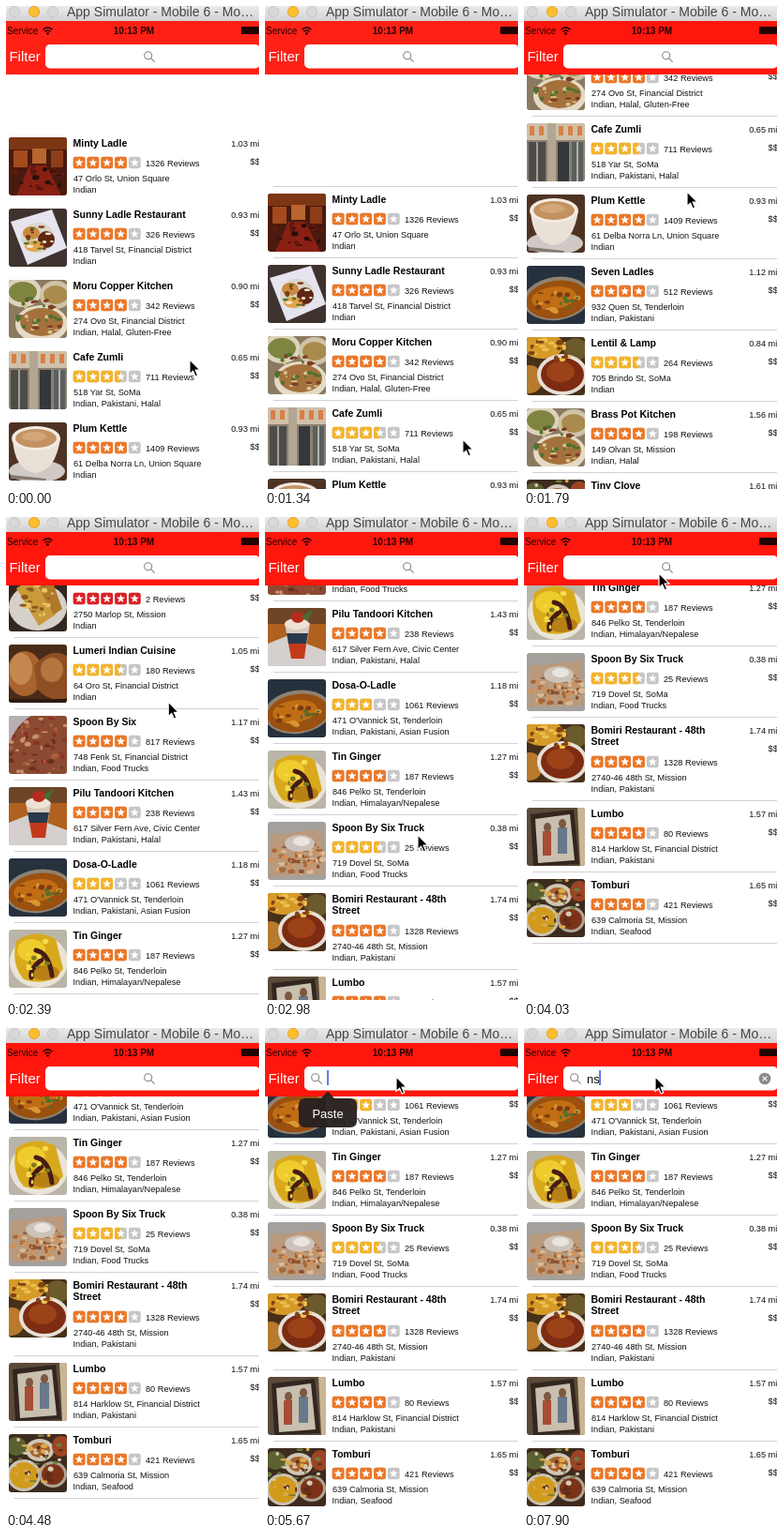
Write an HTML page that moves like this. It is 270 px wide and 515 px high and loops after 8000 ms.

```html
<!DOCTYPE html>
<html lang="en">
<head>
<meta charset="utf-8">
<title>Restaurant list</title>
<style>
  html, body { margin: 0; width: 100%; height: 100%; overflow: hidden; background: #fff; }
  svg { display: block; }
  text { font-family: "Liberation Sans", Arial, sans-serif; white-space: pre; }
  .name { font-size: 10.5px; font-weight: bold; fill: #000; }
  .info { font-size: 9.2px; fill: #111; }
  .right { text-anchor: end; }
</style>
</head>
<body>
<svg id="stage" width="270" height="515" viewBox="0 0 270 515">
  <defs>
    <clipPath id="round"><rect width="62" height="62" rx="3"/></clipPath>
    <linearGradient id="chrome" x2="0" y2="1">
      <stop stop-color="#ebeaeb"/><stop offset="1" stop-color="#d3d2d3"/>
    </linearGradient>
  </defs>
  <rect width="270" height="515" fill="#fff"/>
  <g id="list"><g id="lines"></g><g id="rows"></g></g>

  <rect id="bar" y="16" width="270" height="57"/>
  <rect width="270" height="16" fill="url(#chrome)"/>
  <g stroke-width=".8">
    <circle cx="9" cy="6" r="5.7" fill="#d9d8d9" stroke="#c3c2c3"/>
    <circle cx="30" cy="6" r="5.7" fill="#fdbd2e" stroke="#dfa023"/>
    <circle cx="50" cy="6" r="5.7" fill="#d9d8d9" stroke="#c3c2c3"/>
  </g>
  <text x="65" y="11.4" font-size="14" fill="#444">App Simulator - Mobile 6 - Mo…</text>

  <g fill="#210402">
    <text x="1" y="30" font-size="10">Service</text>
    <text x="136.5" y="30" font-size="10" font-weight="bold" text-anchor="middle">10:13 PM</text>
    <rect x="251" y="22" width="24" height="8" rx="1.5"/>
    <circle cx="44.5" cy="29.4" r="1.3"/>
    <path d="M39.5 25.2q5-4.6 10 0M41.5 27.4q3-2.8 6 0" fill="none" stroke="#210402" stroke-width="1.5"/>
  </g>

  <text x="3.4" y="58.8" font-size="15" fill="#fff">Filter</text>
  <rect x="42" y="41" width="229" height="25.5" rx="5" fill="#fff"/>
  <g id="lens" fill="none" stroke="#85858a" stroke-width="1.1">
    <circle cx="-1.3" cy="-1.3" r="4"/><path d="M1.6 1.6L5.6 5.6"/>
  </g>
  <text id="query" x="67" y="58.5" font-size="13" fill="#111"></text>
  <rect id="caret" y="45" width="1.7" height="16" fill="#4568e6"/>
  <g id="clear">
    <circle cx="257" cy="54" r="6.3" fill="#88888d"/>
    <path d="M254.6 51.6l4.8 4.8m0-4.8l-4.8 4.8" stroke="#fff" stroke-width="1.2"/>
  </g>
  <g id="paste">
    <path d="M43 75H60L67 67.5L74 75H91Q98 75 98 82V99Q98 106 91 106H43Q36 106 36 99V82Q36 75 43 75Z" fill="#272120" fill-opacity=".96"/>
    <text x="67" y="95.5" font-size="13" fill="#fff" text-anchor="middle">Paste</text>
  </g>
  <path id="mouse" d="M0 0V15.4L3.6 12.2L6.2 18L8.7 16.9L6.2 11.2H11Z" fill="#000" stroke="#fff" stroke-width="1.2"/>
</svg>

<script>
const $ = id => document.getElementById(id);

// Photo parts, each in a 62 px square
const box = (x, y, w, h, fill) => `<rect x="${x}" y="${y}" width="${w}" height="${h}" fill="${fill}"/>`;
const oval = (x, y, rx, ry, fill) => `<ellipse cx="${x}" cy="${y}" rx="${rx}" ry="${ry}" fill="${fill}"/>`;
const poly = (d, fill) => `<path d="${d}" fill="${fill}"/>`;
const base = fill => box(0, 0, 62, 62, fill);

function specks(seed, count, x, y, rx, ry, ...colors) {
  const rand = () => (seed = seed * 16807 % 2147483647) / 2147483647;
  rand();
  let out = "";
  for (let i = 0; i < count; i++) {
    const a = rand() * 6.283, d = Math.sqrt(rand());
    out += oval((x + Math.cos(a) * d * rx).toFixed(1), (y + Math.sin(a) * d * ry).toFixed(1),
      (1 + rand() * 3).toFixed(1), (.8 + rand() * 2).toFixed(1), colors[i % colors.length]);
  }
  return out;
}

const photos = {
  room: () => base("#4a1a0e") + box(0, 0, 62, 13, "#7c3614") + box(5, 14, 15, 18, "#a54a1c") +
    box(25, 12, 15, 16, "#b9652f") + box(45, 14, 13, 18, "#8d3d19") +
    poly("M22 30H40L56 62H8Z", "#8a2014") + specks(17, 26, 31, 43, 30, 13, "#2a0e0a", "#641a10"),
  plate: () => base("#3f3330") + poly("M2 14L46 1L62 42L20 60Z", "#e6e4ee") + oval(31, 31, 18, 16, "#dcd5cc") +
    oval(24, 26, 9, 7, "#c98a3e") + oval(40, 33, 9, 9, "#5f2614") + oval(27, 40, 10, 6, "#e3a44c") +
    specks(5, 16, 32, 32, 15, 13, "#7d3a17", "#f2e7d0", "#54752e"),
  bowls: () => base("#8a7a62") + oval(15, 13, 20, 16, "#ddd3bd") + oval(15, 13, 15, 11, "#7f8541") +
    oval(50, 16, 17, 15, "#cfc3a7") + oval(50, 16, 13, 10, "#a98b4d") + oval(35, 47, 28, 20, "#e4dac5") +
    oval(35, 45, 23, 15, "#a4713c") + specks(23, 34, 34, 38, 25, 22, "#4f7230", "#d8c28d", "#7d3f23"),
  shop: () => base("#8c8071") + box(0, 0, 62, 18, "#cfc0aa") +
    [3, 13, 34, 44, 54].map(x => box(x, 3, 5, 10, "#d87f45")).join("") + box(22, 0, 9, 62, "#b3a692") +
    box(2, 20, 18, 42, "#4d4c49") + box(33, 20, 12, 42, "#35383a") + box(48, 20, 12, 42, "#59605f") +
    box(10, 20, 2, 42, "#a5a095") + box(53, 20, 2, 42, "#b5b0a4"),
  cup: () => base("#4e3323") + oval(30, 52, 30, 12, "#cfc8c4") + poly("M4 17Q6 51 28 54Q50 52 55 17Z", "#e9e1d8") +
    oval(29, 17, 26, 13, "#f2ebe2") + oval(29, 17, 22, 10, "#c39263") + oval(27, 15, 13, 5, "#d2a678") +
    poly("M2 56L40 60L39 62L2 60Z", "#85786e"),
  rolls: () => base("#33271f") + oval(31, 36, 31, 25, "#d5d1c8") + poly("M8 16L24 6L50 44L32 56Z", "#c99a3a") +
    poly("M27 8L45 4L57 38L48 44Z", "#b0782a") + specks(9, 20, 31, 29, 18, 18, "#e6c365", "#8d5820"),
  pastry: () => base("#4a2a18") + oval(17, 31, 19, 24, "#a8632f") + oval(13, 26, 12, 17, "#c58850") +
    poly("M27 22Q45 2 62 12V57Q42 62 30 47Z", "#8f4f24") + oval(46, 27, 12, 13, "#b57640") + box(0, 58, 62, 4, "#2e1a10"),
  stew: () => base("#8a4b32") + specks(31, 75, 31, 31, 36, 36, "#a9603c", "#64301f", "#c88f6d", "#8e2e22") +
    poly("M0 0H24Q8 9 0 30Z", "#b5afb3"),
  glass: () => base("#b0611f") + box(0, 0, 62, 17, "#6d4526") + poly("M0 38L20 30L62 46V62H0Z", "#d5cfcd") +
    poly("M18 16H45L39 55H25Z", "#d9cabf") + poly("M20 27H43L41 38H22Z", "#27394a") + poly("M22 38H41L39 54H25Z", "#c23a1b") +
    oval(31, 17, 13, 6, "#eee2d4") + oval(32, 10, 7, 6, "#b82a1c") + poly("M36 9L49 1L42 14Z", "#496c31"),
  curry: () => base("#26313d") + `<g transform="rotate(-8 31 35)">` + oval(32, 35, 36, 23, "#8f8271") +
    oval(32, 36, 33, 20, "#9a500f") + oval(29, 34, 24, 12, "#c06d14") + "</g>" +
    specks(41, 24, 31, 36, 24, 13, "#7c3b12", "#da9633", "#5d6b28"),
  chili: () => base("#b9b5a8") + oval(32, 34, 31, 28, "#e9e4d6") + poly("M8 12Q28 -2 50 10L58 42Q42 62 16 53Q2 38 8 12Z", "#d9a91c") +
    oval(24, 22, 15, 12, "#efcc2e") + oval(38, 46, 16, 8, "#b98015") +
    `<path d="M29 22Q43 25 46 49M35 32Q22 42 24 51" fill="none" stroke="#451c14" stroke-width="5" stroke-linecap="round"/>` +
    specks(11, 12, 33, 31, 20, 20, "#7d7a20", "#f6dd50"),
  rice: () => base("#a4a09c") + poly("M3 14L58 8L60 56L2 58Z", "#b99a7c") +
    specks(19, 75, 31, 38, 28, 19, "#a9683a", "#d9bb98", "#8d5230", "#cf9159") + oval(34, 23, 16, 9, "#ccc2ba") +
    oval(36, 21, 9, 5, "#e9e4de"),
  feast: () => base("#463019") + oval(17, 9, 22, 14, "#d59a28") + oval(52, 13, 13, 12, "#6b5a2c") + oval(3, 45, 14, 15, "#b87a2c") +
    oval(38, 40, 27, 22, "#e6e0d6") + oval(38, 40, 23, 18, "#7d2b12") + oval(36, 37, 15, 11, "#9c4219") +
    specks(13, 26, 24, 14, 24, 12, "#ecc04f", "#7f4217"),
  poster: () => base("#5a4a3a") + poly("M54 0H62V62H57Z", "#c9b695") + poly("M4 7L50 2L56 60L7 62Z", "#33261f") +
    poly("M9 12L46 7L51 56L12 59Z", "#c9bfae") + box(17, 25, 9, 26, "#a84c35") + oval(22, 21, 4, 5, "#7d5840") +
    box(33, 21, 10, 28, "#68798c") + oval(38, 17, 4, 5, "#7d5840"),
  spread: () => base("#3d2b1e") + oval(16, 44, 18, 17, "#c9c2b4") + oval(16, 44, 15, 14, "#d09a1c") + oval(47, 43, 15, 14, "#b0a595") +
    oval(47, 43, 12, 11, "#7c3217") + oval(33, 17, 15, 12, "#cfc6b4") + oval(33, 17, 11, 8, "#a8602a") +
    oval(8, 13, 11, 10, "#5a6030") + oval(56, 13, 10, 11, "#9c4424") +
    specks(29, 44, 31, 27, 31, 29, "#d9a94c", "#5e2c16", "#6f7c3c", "#d6cbb6"),
};

// name, stars, reviews, address, categories, miles, photo
const places = [
  ["Minty Ladle", 4, 1326, "47 Orlo St, Union Square", "Indian", "1.03", "room"],
  ["Sunny Ladle Restaurant", 4, 326, "418 Tarvel St, Financial District", "Indian", "0.93", "plate"],
  ["Moru Copper Kitchen", 4, 342, "274 Ovo St, Financial District", "Indian, Halal, Gluten-Free", "0.90", "bowls"],
  ["Cafe Zumli", 3.5, 711, "518 Yar St, SoMa", "Indian, Pakistani, Halal", "0.65", "shop"],
  ["Plum Kettle", 4, 1409, "61 Delba Norra Ln, Union Square", "Indian", "0.93", "cup"],
  ["Seven Ladles", 4, 512, "932 Quen St, Tenderloin", "Indian, Pakistani", "1.12", "curry"],
  ["Lentil & Lamp", 3.5, 264, "705 Brindo St, SoMa", "Indian", "0.84", "feast"],
  ["Brass Pot Kitchen", 4, 198, "149 Olvan St, Mission", "Indian, Halal", "1.56", "bowls"],
  ["Tiny Clove", 4, 87, "386 Pranto St, Mission", "Indian", "1.61", "spread"],
  ["Okra Room", 3.5, 143, "260 Dellam St, SoMa", "Indian", "0.72", "plate"],
  ["Ginger Wagon", 5, 2, "2750 Marlop St, Mission", "Indian", "1.38", "rolls"],
  ["Lumeri Indian Cuisine", 3.5, 180, "64 Oro St, Financial District", "Indian", "1.05", "pastry"],
  ["Spoon By Six", 4, 817, "748 Fenk St, Financial District", "Indian, Food Trucks", "1.17", "stew"],
  ["Pilu Tandoori Kitchen", 4, 238, "617 Silver Fern Ave, Civic Center", "Indian, Pakistani, Halal", "1.43", "glass"],
  ["Dosa-O-Ladle", 3, 1061, "471 O'Vannick St, Tenderloin", "Indian, Pakistani, Asian Fusion", "1.18", "curry"],
  ["Tin Ginger", 4, 187, "846 Pelko St, Tenderloin", "Indian, Himalayan/Nepalese", "1.27", "chili"],
  ["Spoon By Six Truck", 3.5, 25, "719 Dovel St, SoMa", "Indian, Food Trucks", "0.38", "rice"],
  ["Bomiri Restaurant - 48th|Street", 4, 1328, "2740-46 48th St, Mission", "Indian, Pakistani", "1.74", "feast"],
  ["Lumbo", 4, 80, "814 Harklow St, Financial District", "Indian, Pakistani", "1.57", "poster"],
  ["Tomburi", 4, 421, "639 Calmoria St, Mission", "Indian, Seafood", "1.65", "spread"],
];

const label = (cls, x, y, s) => `<text class="${cls}" x="${x}" y="${y}">${s.replace("&", "&amp;")}</text>`;

const starPoints = Array.from({ length: 10 }, (_, i) => {
  const a = i * Math.PI / 5, r = i % 2 ? 2 : 4.8;
  return `${(6.4 + r * Math.sin(a)).toFixed(2)},${(6.5 - r * Math.cos(a)).toFixed(2)}`;
}).join(" ");

function rating(score, y) {
  const color = score === 5 ? "#dc2024" : score === 4 ? "#ec7727" : "#f3b32b";
  let out = "";
  for (let i = 0; i < 5; i++) {
    const part = Math.max(0, Math.min(1, score - i));
    out += `<g transform="translate(${71.7 + i * 14.8} ${y})"><rect width="12.8" height="12.6" rx="2.4" fill="#c6c6c6"/>` +
      (part ? `<rect width="${12.8 * part}" height="12.6" rx="${part < 1 ? 1.5 : 2.4}" fill="${color}"/>` : "") +
      `<polygon points="${starPoints}" fill="#fff"/></g>`;
  }
  return out;
}

function build() {
  let y = 0, rows = "", lines = "";
  const line = () => { lines += box(9, y - 1, 261, 1, "#d2d1d5"); };
  for (const [name, stars, reviews, address, kinds, miles, photo] of places) {
    const names = name.split("|"), extra = (names.length - 1) * 13;
    line();
    rows += `<g transform="translate(0 ${y})">` +
      `<g transform="translate(3 7)" clip-path="url(#round)">${photos[photo]()}</g>` +
      names.map((s, i) => label("name", 71.5, 17.3 + i * 12, s)).join("") +
      rating(stars, 27.7 + extra) +
      label("info", 149, 37.6 + extra, `${reviews} Reviews`) +
      label("info", 72, 53.6 + extra, address) +
      label("info", 71.5, 66.4 + extra, kinds) +
      label("info right", 270.3, 17.3, `${miles} mi`) +
      label("info right", 270.8, 35.5, "$$") + "</g>";
    y += 76 + extra;
  }
  line();
  $("rows").innerHTML = rows;
  $("lines").innerHTML = lines;
}

const LOOP = 8000, START = 1340, STEP = 149.2;

// List top at each step of the scroll
const tops = [193, 150, 40, -110, -310, -475, -603, -707, -788, -850, -898, -936, -966,
  -990, -1006, -1018, -1040, -1062, -1078, -1066, -1045, -1031, -1023, -1018, -1016];

// step, x, y of the pointer
const path = [[0, 211, 462], [1, 206, 415], [3, 174, 198], [8, 173, 197], [11, 158, 410], [13, 152, 430],
  [15, 146, 355], [18, 144, 60], [19, 144, -30], [21, 150, -30], [22, 150, 16], [24, 146, 132],
  [25, 146, 132], [27, 143, 30], [28, 141, 49], [29, 140, 52]];

function pointer(step) {
  if (step < 0) return [196, 377];
  const i = path.findIndex(p => p[0] >= step);
  const b = path[i], a = path[Math.max(0, i - 1)];
  const k = b === a ? 0 : (step - a[0]) / (b[0] - a[0]);
  return [a[1] + (b[1] - a[1]) * k, a[2] + (b[2] - a[2]) * k];
}

const held = (steps, t) => steps.reduce((v, [at, next]) => t >= at ? next : v, steps[0][1]);

const caretFade = [[0, 0], [5517, 1], [6120, .5], [6270, 0], [6570, .5], [6720, 1], [7600, .5], [7750, 0], [7900, 1]];
const pasteFade = [[0, 0], [5666, 1], [7010, .4], [7160, 0]];
const typed = [[0, ""], [7010, "n"], [7900, "ns"]];
const caretX = [66.2, 73.6, 80.2];

function draw(t) {
  const step = Math.min(29, Math.floor((t - START) / STEP));
  const top = t < 140 ? 133 : tops[Math.max(0, Math.min(step, tops.length - 1))];
  const [mx, my] = pointer(step);
  const query = held(typed, t);
  const show = (id, v) => $(id).setAttribute("opacity", v);
  const move = (id, x, y) => $(id).setAttribute("transform", `translate(${x} ${y})`);

  move("list", 0, top);
  move("mouse", mx, my);
  move("lens", step < 27 ? 153 : step === 27 ? 98 : 55, 54);
  show("lines", t < 140 ? 0 : 1);
  show("caret", held(caretFade, t));
  show("paste", held(pasteFade, t));
  show("clear", query ? 1 : 0);
  $("query").textContent = query;
  $("caret").setAttribute("x", caretX[query.length]);
  $("bar").setAttribute("fill", top < 73 ? "#ff160d" : "#ff2016");
}

build();
const origin = performance.now();
function tick() {
  draw((performance.now() - origin) % LOOP);
  requestAnimationFrame(tick);
}
tick();
</script>
</body>
</html>
```
